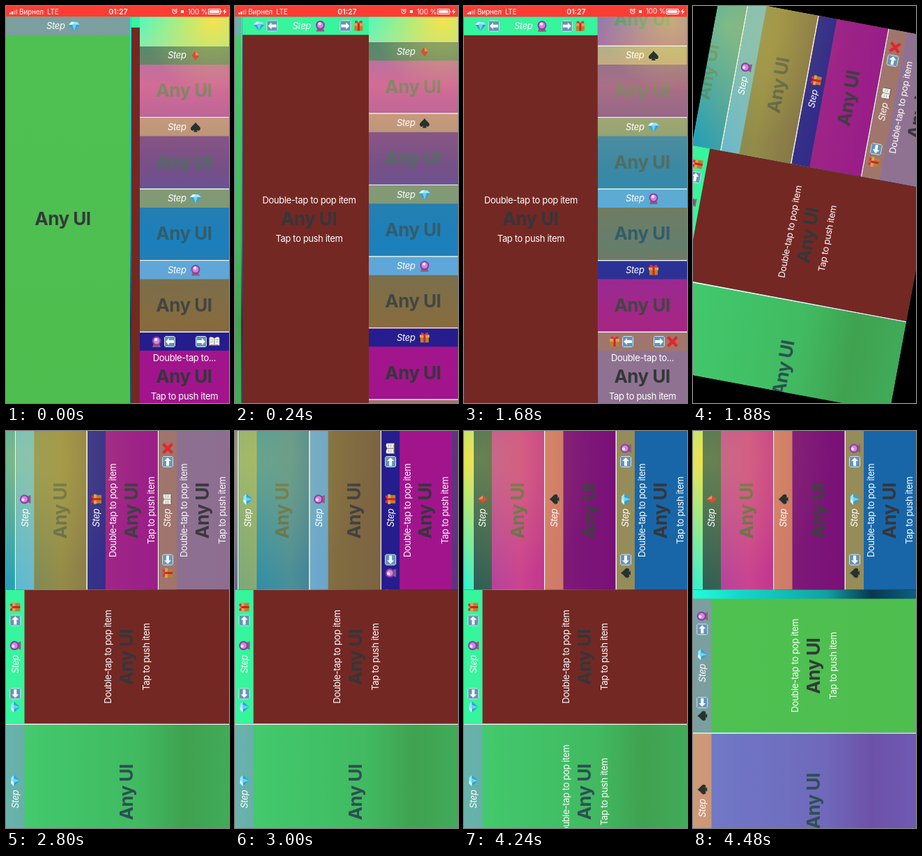
Write an HTML page with a canvas that moves like this. It is 320 px wide and 569 px high and loops after 4520 ms.

```html
<!DOCTYPE html>
<html lang="ru">
<meta charset="utf-8">
<title>Stacked cards</title>
<style>
  html, body { margin: 0; width: 100%; height: 100%; overflow: hidden; background: #000; }
  canvas { display: block; width: 320px; height: 569px; }
</style>
<canvas id="stage" width="320" height="569"></canvas>
<script>
const c = document.getElementById('stage').getContext('2d');
const LOOP = 4520, CARD_W = 192, ROW_H = 101, FONT = 'Inter, "Liberation Sans", sans-serif';

// Icons: [colour, path] layers on a 16 x 16 grid centred on 0,0.
const ICONS = Object.fromEntries(Object.entries({
  lozenge: [['#d8502f', 'M0-7L5.5 0L0 7L-5.5 0Z'], ['#f08a62', 'M0-7L5.5 0L0 0Z']],
  spade: [['#26322e', 'M0-7C2-3 7-1 7 2C7 6 2 6 1 3L3 7H-3L-1 3C-2 6-7 6-7 2C-7-1-2-3 0-7Z']],
  gem: [['#2ba3d8', 'M-4-6H4L8-2L0 7L-8-2Z'], ['#9be6fa', 'M-4-6H4L8-2H-8Z'],
    ['#6fd0f2', 'M-3-2H3L0 7Z'], ['#e2fbff', 'M-4-6H0L-3-2H-8Z']],
  ball: [['#8a6070', 'M-4 3H4L6 8H-6Z'], ['#8a3aa8', 'M-6.5-1A6.5 6.5 0 1 1 6.5-1A6.5 6.5 0 1 1-6.5-1Z'],
    ['#cf86de', 'M-4.5-1A4.5 4.5 0 1 1 4.5-1A4.5 4.5 0 1 1-4.5-1Z'],
    ['#fbe4fc', 'M-3-3A2.2 2.2 0 1 1 1.4-3A2.2 2.2 0 1 1-3-3Z']],
  gift: [['#b9812f', 'M-6-1H6V7H-6Z'], ['#dca648', 'M-7-4H7V0H-7Z'], ['#d3202b', 'M-1.5-4H1.5V7H-1.5Z'],
    ['#e2303a', 'M0-4L-5-4C-7-8-2-9 0-4C2-9 7-8 5-4Z']],
  book: [['#75665c', 'M-8-5H8V6H-8Z'], ['#f4f4ee', 'M-7-6C-4-7-2-6-.4-5V5C-2 4-4 4-7 5ZM7-6C4-7 2-6 .4-5V5C2 4 4 4 7 5Z'],
    ['#a9aaa8', 'M-6-3H-2V-2H-6ZM-6 0H-2V1H-6ZM2-3H6V-2H2ZM2 0H6V1H2Z']],
  left: [['#d5e2ea', 'M-6-8H6L8-6V6L6 8H-6L-8 6V-6Z'], ['#6494b8', 'M-7-7H7V7H-7Z'],
    ['#fff', 'M-6 0L-1-5V-2H6V2H-1V5Z']],
  right: [['#d5e2ea', 'M-6-8H6L8-6V6L6 8H-6L-8 6V-6Z'], ['#6494b8', 'M-7-7H7V7H-7Z'],
    ['#fff', 'M6 0L1-5V-2H-6V2H1V5Z']],
  cross: [['#e5252a', 'M-5-8L0-3L5-8L8-5L3 0L8 5L5 8L0 3L-5 8L-8 5L-3 0L-8-5Z']]
}).map(([name, layers]) => [name, layers.map(([fill, d]) => [fill, new Path2D(d)])]));

const ITEMS = ['lozenge', 'spade', 'gem', 'ball', 'gift', 'book'];
// [header, body] per item
const LIST_COLORS = [['#202832', '#cc009c'], ['#d87468', '#7c047a'], ['#958c5a', '#1866a8'],
  ['#62a4dc', '#7f643a'], ['#251c8e', '#a2148c'], ['#a0766c', '#8f7292']];
const MAIN_COLORS = [['#202832', '#cc009c'], ['#ff7d5d', '#8a58c2'], ['#7c9e9e', '#4fc04f'], ['#36f59c', '#742823']];

// Moves: [start, duration, top item before, top item after]
const MAIN_MOVES = [[-125, 480, 2, 3], [4220, 350, 3, 2]];
const LIST_MOVES = [[-1000, 1, 4, 4], [140, 420, 4, 5], [2770, 320, 5, 4], [3490, 320, 4, 2]];

const clamp = v => Math.max(0, Math.min(1, v));
const mix = (a, b, u) => a + (b - a) * u;
const easeInOut = (u, n = 3) => u < .5 ? (2 * u) ** n / 2 : 1 - (2 - 2 * u) ** n / 2;

function rect(fill, x, y, w, h) {
  c.fillStyle = fill;
  c.fillRect(x, y, w, h);
}

function text(s, x, y, { font = '13px', fill = '#fff', align = 'center', gap = -.35 } = {}) {
  c.font = `${font} ${FONT}`;
  c.letterSpacing = gap + 'px';
  c.textAlign = align;
  c.textBaseline = 'middle';
  c.fillStyle = fill;
  c.fillText(s, x, y);
}

function icon(name, x, y) {
  c.save();
  c.translate(x, y);
  for (const [fill, path] of ICONS[name]) {
    c.fillStyle = fill;
    c.fill(path);
  }
  c.restore();
}

// Wallpaper as soft gradients; returns a painter for any part of it.
function makeWall(w, h, p) {
  const vertical = colors => {
    const g = c.createLinearGradient(0, 0, 0, h);
    colors.forEach((col, i) => g.addColorStop(i / (colors.length - 1), col));
    return g;
  };
  const main = vertical(['#20ffd8', '#14d8cc', '#10c0b8', '#10a0a0', '#083850', '#0c6080']);
  const side = vertical(p > .5 ? ['#30f0d0', '#c8f070', '#808868', '#604870', '#603080']
    : ['#40ffc0', '#d8d890', '#70b898', '#20c0f0', '#b89858', '#503890']);
  const glow = c.createRadialGradient(.93 * w, 20, 0, .93 * w, 20, .32 * w);
  glow.addColorStop(0, 'rgba(255,225,70,.95)');
  glow.addColorStop(1, 'rgba(255,225,70,0)');
  return (x, y, cw, ch) => {
    rect(x < .59 * w ? main : side, x, y, cw, ch);
    rect(glow, x, y, cw, ch);
  };
}

function card(i, x, y, w, h, o) {
  const [head, body] = o.colors[i], cx = x + w / 2, mid = y + o.head + (h - o.head) / 2 + 1, hy = y + o.head / 2;
  c.save();
  c.beginPath();
  c.rect(x, y, w, h);
  c.clip();
  c.globalAlpha = o.alpha;
  rect(body, x, y, w, h);
  rect(head, x, y, w, o.head);
  text('Any UI', cx - .5, mid, { font: 'bold 26px', fill: '#35363a', gap: -.5 });
  c.globalAlpha = o.alpha * o.tint;
  o.wall(x, y, w, h);
  c.globalAlpha = o.alpha;
  if (o.labels) {
    text(w < 142 ? 'Double-tap to...' : 'Double-tap to pop item', cx, mid - 27);
    text('Tap to push item', cx, mid + 27.5);
  }
  if (o.buttons) {
    const edge = x + w - (w < 150 ? 21 : 25);
    icon(ITEMS[i - 1] || 'cross', x + 24, hy);
    icon('left', x + 43, hy);
    icon('right', edge - 19, hy);
    icon(ITEMS[i + 1] || 'cross', edge, hy);
  }
  if (!o.buttons || w >= 150) {
    text('Step', cx - 24, hy + .5, { font: 'italic 13px', align: 'left' });
    icon(ITEMS[i], cx + 16, hy);
  }
  c.restore();
}

// Pushed cards slide in; popped cards fade where they stand.
function stack(t, moves, place) {
  const [start, dur, from, to] = moves.filter(m => m[0] <= t).pop();
  const u = clamp((t - start) / dur), e = easeInOut(u), top = mix(from, to, e);
  for (let i = Math.max(from, to); i >= 0; i--) {
    const popped = i > to, alpha = popped ? clamp(1.1 - 1.5 * u) : 1;
    if (!alpha) continue;
    place(i, popped ? from - i : top - i, {
      alpha,
      labels: i >= to,
      buttons: (popped && i === from) || (i === to && (to >= from || u > .5)),
      head: 26.5 - (i === to && to > from ? 12 * (1 - e) : 0)
    });
  }
}

function statusBar(w) {
  const small = { font: '10px', align: 'left', gap: -.2 };
  rect('#fb3d34', 0, 0, w, 15.5);
  for (let i = 0; i < 4; i++) {
    c.globalAlpha = i < 2 ? 1 : .4;
    rect('#fff', 5 + i * 3, 9.5 - i * 1.6, 2.2, 2.5 + i * 1.6);
  }
  c.globalAlpha = 1;
  text('Вирнел', 19, 8.5, small);
  text('LTE', 59, 8.5, small);
  text('01:27', w / 2 + 1, 8.5, { font: '600 10.5px', gap: 0 });
  c.strokeStyle = '#fff';
  c.lineWidth = 1;
  c.beginPath();
  c.arc(w - 78, 8, 3, 0, 7);
  c.moveTo(w - 78, 6);
  c.lineTo(w - 78, 8);
  c.lineTo(w - 76.5, 8);
  c.moveTo(w - 82, 5.5);
  c.lineTo(w - 80, 4);
  c.moveTo(w - 74, 5.5);
  c.lineTo(w - 76, 4);
  c.stroke();
  rect('#fff', w - 69, 6, 4, 4);
  text('100 %', w - 59, 8.5, small);
  c.strokeRect(w - 29.5, 4.5, 17, 7);
  rect('#fff', w - 28, 6, 14, 4);
  rect('#fff', w - 11.5, 6.5, 1, 3);
  c.fill(new Path2D(`M${w - 5} 3.5l-4 5h2.5l-1 4l4-5h-2.5z`));
}

function draw(t) {
  const p = easeInOut(clamp((t - 1640) / 385), 5);
  const w = mix(320, 569, p), h = mix(569, 320, p), bar = 15.5 * clamp(1 - 1.2 * p), split = .6 * w;
  const wall = makeWall(w, h, p);
  rect('#000', 0, 0, 320, 569);
  c.save();
  c.translate(160, 284.5);
  c.rotate(-p * Math.PI / 2);
  c.translate(-w / 2, -h / 2);
  c.beginPath();
  c.rect(0, 0, w, h);
  c.clip();
  wall(0, 0, split, h);
  wall(split, 0, w - split, h);

  c.save();
  c.beginPath();
  c.rect(0, bar, split, h - bar);
  c.clip();
  stack(t, MAIN_MOVES, (i, slot, o) => {
    const x = split - CARD_W - slot * (CARD_W + 1.5);
    if (x + CARD_W < 0) return;
    if (slot >= 0) rect('#f4f4ee', x - 1.5, bar, 1.5, h);
    card(i, x, bar, CARD_W, h - bar, { ...o, wall, colors: MAIN_COLORS, tint: .22 * clamp(slot) });
  });
  c.restore();

  c.save();
  c.beginPath();
  c.rect(split, bar, w - split, h - bar);
  c.clip();
  stack(t, LIST_MOVES, (i, slot, o) => {
    const y = h - ROW_H - slot * (ROW_H + 1.5);
    if (y + ROW_H < 0) return;
    if (i > 0) rect('#f4f4ee', split, y - 1.5, w - split, 1.5);
    card(i, split, y, w - split, ROW_H, {
      ...o, wall, colors: LIST_COLORS, head: 26, tint: Math.min(.5, .14 * Math.max(0, slot))
    });
  });
  c.restore();

  c.translate(0, bar - 15.5);
  if (bar > 0) statusBar(w);
  c.restore();
}

const begin = performance.now();
function tick() {
  draw((performance.now() - begin) % LOOP);
  requestAnimationFrame(tick);
}
tick();
</script>
</html>
```
